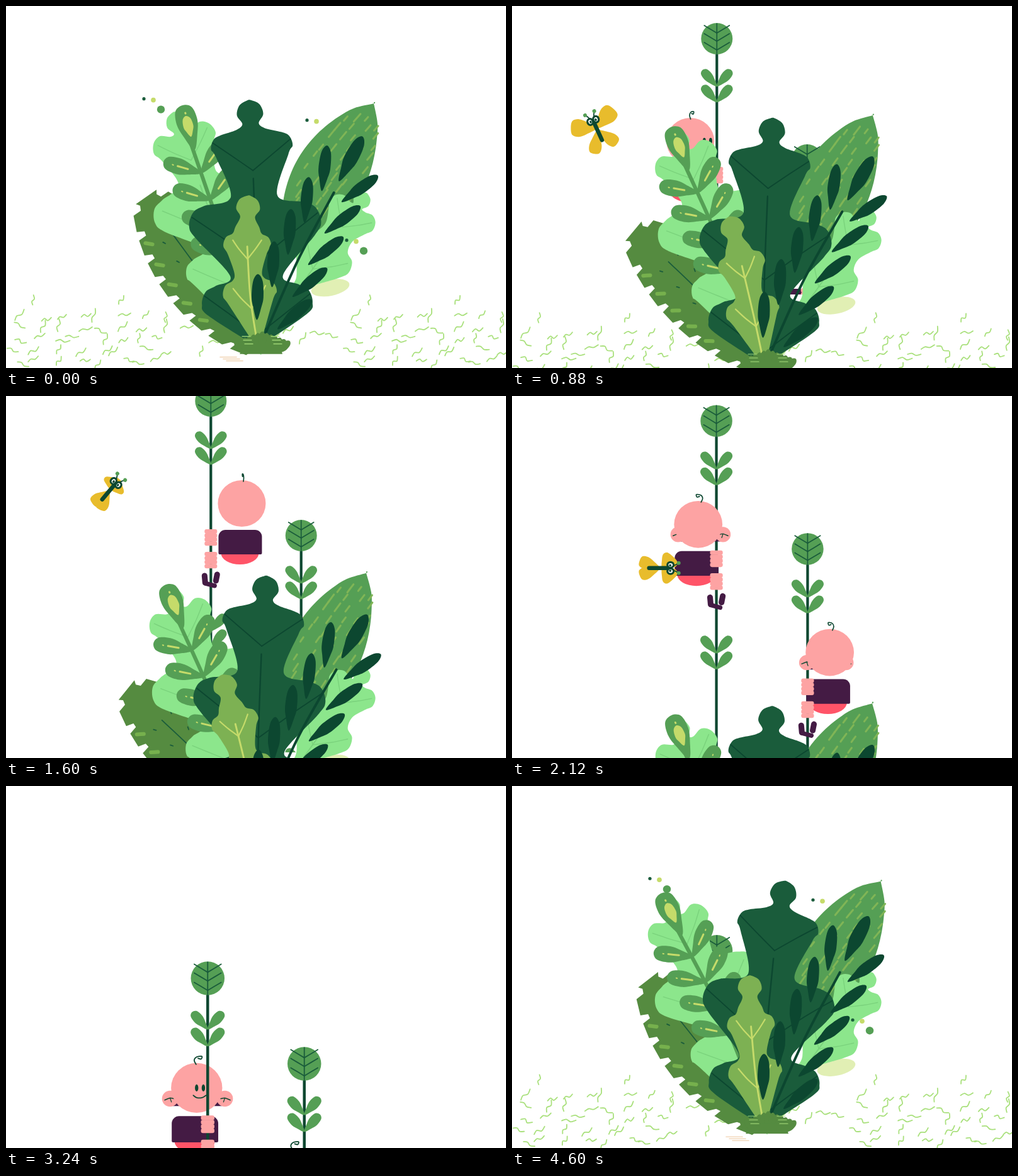
Write an HTML page with a canvas that moves like this. It is 794x576 px and loops after 4.64 s.

```html
<!DOCTYPE html>
<html lang="en">
<head>
<meta charset="utf-8">
<title>Garden climb</title>
<style>
html, body { margin: 0; width: 100%; height: 100%; overflow: hidden; background: #fff; }
canvas { display: block; }
</style>
</head>
<body>
<canvas id="stage" width="794" height="576"></canvas>
<script>
const ctx = document.getElementById('stage').getContext('2d');
const LOOP = 4640, REGROW = 3400, LEAD = 1000;
const C = {
  deep: '#0c4730', dark: '#1a5c3b', mid: '#559f55', olive: '#7db153', moss: '#558b40',
  light: '#8ce68c', lightVein: '#7ad27c', lemon: '#c5db6a', cream: '#e1efb4', grass: '#a9e07c',
  dash: '#80b556', skin: '#fda3a3', plum: '#441b44', red: '#ff5468', gold: '#e8bc2c', sand: '#f3d9bd'
};

const clamp01 = v => Math.max(0, Math.min(1, v));
const smooth = v => { v = clamp01(v); return v * v * (3 - 2 * v); };
const mix = (a, b, s) => a + (b - a) * s;

function randomizer(seed) {
  return () => (seed = seed * 16807 % 2147483647) / 2147483647;
}

// Monotone spline through flat [time, value, ...] keys.
function track(keys, time) {
  const n = keys.length / 2, T = i => keys[2 * i], V = i => keys[2 * i + 1];
  const slope = i => (V(i + 1) - V(i)) / (T(i + 1) - T(i));
  const tangent = i => {
    if (i === 0 || i === n - 1) return 0;
    const a = slope(i - 1), b = slope(i);
    return a * b <= 0 ? 0 : 2 * a * b / (a + b);
  };
  if (time <= T(0)) return V(0);
  if (time >= T(n - 1)) return V(n - 1);
  let i = 0;
  while (time > T(i + 1)) i++;
  const span = T(i + 1) - T(i), s = (time - T(i)) / span, r = 1 - s;
  return V(i) * (1 + 2 * s) * r * r + V(i + 1) * s * s * (3 - 2 * s)
    + span * s * r * (tangent(i) * r - tangent(i + 1) * s);
}

// ---- drawing helpers; `warp` maps a local point to the screen ----
const same = (x, y) => [x, y];

function trace(pts, closed) {
  const n = pts.length;
  const at = i => closed ? pts[(i + n) % n] : pts[Math.max(0, Math.min(n - 1, i))];
  ctx.beginPath();
  ctx.moveTo(...pts[0]);
  for (let i = 0; i < (closed ? n : n - 1); i++) {
    const [a, b, c, d] = [at(i - 1), at(i), at(i + 1), at(i + 2)];
    ctx.bezierCurveTo(b[0] + (c[0] - a[0]) / 6, b[1] + (c[1] - a[1]) / 6,
      c[0] - (d[0] - b[0]) / 6, c[1] - (d[1] - b[1]) / 6, c[0], c[1]);
  }
}

function fill(color) {
  ctx.fillStyle = color;
  ctx.fill();
}

function line(flat, color, width, warp = same) {
  const pts = [];
  for (let i = 0; i < flat.length; i += 2) pts.push(warp(flat[i], flat[i + 1]));
  trace(pts, false);
  ctx.strokeStyle = color;
  ctx.lineWidth = width;
  ctx.stroke();
}

function oval(x, y, rx, ry, color, turn = 0) {
  ctx.beginPath();
  ctx.ellipse(x, y, rx, ry, turn, 0, 7);
  fill(color);
}

// Leaflet from stem point a to tip b; `belly` moves the widest part towards the tip.
function petal(ax, ay, bx, by, half, color, warp = same, belly = 0.5) {
  const [x0, y0] = warp(ax, ay), [x1, y1] = warp(bx, by);
  const dx = x1 - x0, dy = y1 - y0, full = Math.hypot(bx - ax, by - ay);
  const p = (s, w) => [x0 + dx * s - dy / full * half * w, y0 + dy * s + dx / full * half * w];
  const late = (1 + belly) / 2 + .1;
  trace([p(0, 0), p(belly * .55, .68), p(belly, 1), p(late, .8), p(1, 0),
    p(late, -.8), p(belly, -1), p(belly * .55, -.68)], true);
  fill(color);
}

// Closes a half outline of [side, height] points by mirroring it over the stem.
const mirrored = (half, warp) =>
  [...half, ...half.map(([x, h]) => [-x, h]).reverse()].map(p => warp(...p));

// ---- leaves: side and height are measured from the root along the stem ----

// Lobes from root to tip: [reach, height, radius]; radius 0 is a notch.
function lobedLeaf(lobes, color, vein, veinWidth, veinReach) {
  const half = [[3, 0]];
  for (const [x, h, r] of lobes)
    for (const a of r ? [-.9, -.1, .7, 1.4] : [0]) half.push([x - r + r * Math.cos(a), h + r * Math.sin(a)]);
  const height = lobes.at(-1)[1];
  return w => {
    trace(mirrored(half, w), true);
    fill(color);
    line([0, 5, 0, height * .35, 0, height * .72], vein, veinWidth * 1.3, w);
    for (const [x, h, r] of lobes.slice(0, -1)) {
      if (!r) continue;
      for (const side of [-veinReach, veinReach])
        line([0, h - x * .6, side * x * .55, h - x * .2, side * x, h + r * .4], vein, veinWidth, w);
    }
  };
}

function serratedLeaf(w) {
  const width = h => 65 * Math.sin(Math.PI * (.06 + .87 * h / 296)) ** .6;
  const half = [];
  for (let h = 0; h < 280; h += 37)
    half.push([width(h), h], [width(h + 24), h + 24], [width(h + 26) - 13, h + 24], [width(h + 34) - 12, h + 31]);
  half.push([20, 296]);
  ctx.beginPath();
  for (const p of mirrored(half, w)) ctx.lineTo(...p);
  fill(C.moss);
  line([0, 20, 0, 130, 0, 222], C.dark, 1.8, w);
  for (let h = 85; h < 270; h += 37) {
    for (const side of [-1, 1]) {
      const x = side * width(h) * .74;
      line([x - 4, h + 4, x + 4, h - 4], '#76b04d', 6, w);
      line([side * 18, h - 15, side * 20, h - 11], C.dark, 1.8, w);
    }
  }
}

function broadLeaf(w) {
  const width = h => 58 * Math.sin(Math.PI * clamp01((h - 150) / 282)) ** .7;
  const half = [];
  for (let h = 150; h <= 432; h += 23.5) half.push([width(h), h]);
  trace(mirrored(half, w), true);
  fill(C.mid);
  const random = randomizer(11);
  for (let h = 190; h < 405; h += 17) {
    for (let lane = -2; lane <= 2; lane++) {
      const x = width(h) * (lane * .36 + random() * .1), y = h + random() * 14, len = 4 + random() * 4;
      if (random() < .75) line([x, y - len, x + len * .3, y + len], C.dash, 3, w);
    }
  }
}

function sprigLeft(w) {
  line([0, 30, 0, 180, 0, 345], C.mid, 6, w);
  for (let h = 155; h < 300; h += 45.5) {
    for (const side of [-1, 1]) {
      petal(0, h, side * 51, h + 37, 13, C.mid, w, .6);
      line([side * 18, h + 13, side * 32, h + 23], C.lemon, 3, w);
      line([side * 38, h + 27, side * 39, h + 28], C.lemon, 2, w);
    }
  }
  petal(2, 330, 8, 404, 17, C.mid, w, .62);
  petal(4, 352, 7, 386, 8, C.lemon, w);
  line([8, 390, 8, 391], C.lemon, 3, w);
}

function sprigDark(w) {
  line([3, 22, 0, 150, 0, 272], C.deep, 4, w);
  for (let h = 37; h < 270; h += 57)
    for (const side of [-1, 1]) petal(side * 18, h, side * 47, h + 66, 9.3, C.deep, w);
  petal(-2, 292, -6, 372, 11, C.deep, w);
}

const paleLeft = lobedLeaf([[70, 140, 24], [27, 174, 0], [88, 242, 28], [32, 283, 0], [52, 345, 22],
  [18, 360, 0], [18, 377, 18]], C.light, C.lightVein, 1.4, .8);
const paleRight = lobedLeaf([[25, 90, 14], [14, 125, 0], [50, 180, 24], [26, 222, 0], [42, 257, 18],
  [16, 272, 0], [14, 284, 14]], C.light, C.lightVein, 1.4, .8);
const darkOak = lobedLeaf([[88, 70, 27], [42, 112, 0], [105, 196, 30], [37, 238, 0], [65, 318, 20],
  [23, 345, 0], [21, 370, 21]], C.dark, C.deep, 1.8, .95);
const oliveOak = lobedLeaf([[43, 86, 21], [22, 118, 0], [38, 162, 18], [19, 190, 0], [19, 221, 19]],
  C.olive, C.lemon, 2.2, .6);

function paleRightWithRim(w) {
  const [x, y] = w(40, 142), scale = Math.hypot(x - 400, y - 540) / 148;
  oval(x, y, 31 * scale, 13 * scale, C.cream, -.2);
  paleRight(w);
}

// Back to front. Bend is the turn at the tip: early and late rest values plus a springy kick;
// curl is the extra bend of a plant that is still small.
const BUSH = [
  { draw: serratedLeaf, born: 570, height: 290, lean: -.677, early: .03, late: -.21, kick: -.12 },
  { draw: broadLeaf, born: 760, height: 430, lean: .3, early: .29, late: .22, kick: 0 },
  { draw: paleLeft, born: 660, height: 390, lean: -.342, early: -.1, late: -.05, kick: -.3 },
  { draw: paleRightWithRim, born: 615, height: 298, lean: .619, early: 0, late: 0, kick: 0 },
  { draw: sprigLeft, born: 760, height: 400, lean: -.3, early: -.2, late: -.18, kick: -.5 },
  { draw: darkOak, born: 540, height: 390, lean: -.01, early: .12, late: .09, kick: .55 },
  { draw: oliveOak, born: 620, height: 240, lean: -.2, early: .235, late: -.08, kick: -.15 },
  { draw: sprigDark, born: 705, height: 340, lean: .408, early: .13, late: .17, kick: 0, curl: -1.8 }
];

// Bends a plant along a circular arc that leaves the root at angle `lean`.
function arcWarp(lean, bend, grow, height) {
  const k = (Math.abs(bend) < 1e-4 ? 1e-4 : bend) / (height * grow);
  const sin = Math.sin(lean), cos = Math.cos(lean);
  return (x, h) => {
    const a = h * grow * k;
    const side = (1 - Math.cos(a)) / k + x * grow * Math.cos(a);
    const up = Math.sin(a) / k - x * grow * Math.sin(a);
    return [400 + side * cos + up * sin, 540 - up * cos + side * sin];
  };
}

function drawBush(u) {
  const since = Math.max(0, u - 760);
  const spring = Math.exp(-since / 250) * Math.cos(since * Math.PI / 200);
  const settled = smooth((u - 1200) / 800);
  for (const { draw, born, height, lean, early, late, kick, curl = 0 } of BUSH) {
    const grow = 1 - (1 - clamp01((u - born) / 300)) ** 3;
    if (grow < .01) continue;
    draw(arcWarp(lean, mix(early, late, settled) + kick * spring + curl * (1 - grow), grow, height));
  }
}

// ---- ground ----
function squiggle(x, y, random) {
  const turn = random() * 1.9 - 1.2, len = 7 + random() * 4, wave = 2 + random() * 1.5;
  const c = Math.cos(turn), s = Math.sin(turn);
  line([-len, wave, -len * .4, -wave * .4, len * .3, wave * .6, len, -wave], C.grass, 1.8,
    (a, b) => [x + a * c - b * s, y + a * s + b * c]);
}

function drawGround() {
  for (const left of [0, 534]) {
    const random = randomizer(77);
    for (const x of [43, 183]) squiggle(left + x, 467, random);
    for (let row = 0; row < 5; row++)
      for (let i = 0; i < 8; i++)
        squiggle(left + 5 + 33 * (i + random() * .8), 488 + row * 18 + random() * 10, random);
  }
  const random = randomizer(5);
  for (let i = 0; i < 11; i++) squiggle(287 + i * 23, 510 + random() * 58, random);
  for (let i = 0; i < 3; i++) line([340 + i * 5, 558 + i * 3, 366 + i * 5, 558 + i * 3], C.sand, 1.6);
}

function drawTuft() {
  for (let i = -6; i <= 6; i++)
    petal(407 + i * 4, 552, 407 + i * 7.3, 517 + Math.abs(i) * 2.6, 6, C.moss);
  ctx.beginPath();
  for (const [x, y] of [[371, 553], [380, 536], [434, 536], [439, 553]]) ctx.lineTo(x, y);
  fill(C.moss);
  for (let i = 0; i < 3; i++)
    for (const x of [375, 421]) line([x + i * 2, 525 + i * 6, x + 13 + i * 2, 525 + i * 6], C.grass, 1.2);
}

function drawSpecks(u) {
  const rise = 14 * (1 - smooth((u - 720) / 280));
  const size = delay => smooth((u - 650 - delay) / 100) * (1 - smooth((u - 1350) / 250));
  for (const [x, y, trio] of [[219, 147, true], [478, 181, false], [541, 372, true]]) {
    const wait = trio ? 0 : 130;
    oval(x, y + rise, 2.6 * size(wait), 2.6 * size(wait), C.dark);
    oval(x + 15, y + 2 + rise, 3.8 * size(130), 3.8 * size(130), C.lemon);
    if (trio) oval(x + 27, y + 17 + rise, 6.2 * size(0), 6.2 * size(0), C.mid);
  }
}

// ---- climbers ----
const HEAD = [1000,330, 1200,262, 1560,106, 1880,52, 2600,8, 3280,56, 3680,132, 4240,306, 4700,630];
const GAP = [1880,193, 2600,214, 3680,180, 4240,136];
const PAN = [1400,0, 1880,29, 2600,137, 3280,427, 3700,700];

const pan = u => 130 * Math.exp(-u / 190) + track(PAN, u);
const zoomAt = u => 1 + .07 * Math.max(0, (u - 2600) / 1640) ** 1.7;
const orbit = u => Math.min(5.95, -1 + (u - 1880) * .00383);

function drawStalk() {
  line([0, 0, 0, 900], C.deep, 4.2);
  for (const y of [76, 101, 366, 391])
    for (const side of [-1, 1]) petal(0, y, side * 23, y - 26, 7.5, C.mid, same, .6);
  oval(0, 0, 25, 25, C.mid);
  line([0, -24, 0, 25], C.dark, 1.7);
  for (const y of [-9, 4, 18])
    for (const side of [-20, 20]) line([side, y - 12, 0, y], C.dark, 1.7);
}

function drawEar(x, y, d) {
  ctx.beginPath();
  for (const [dx, dy] of [[4, 11], [16, 11], [10, 3]]) ctx.lineTo(x - d * dx, y + dy);
  fill(C.plum);
  oval(x, y, 12, 12, C.skin);
  line([x + d * 8, y + 2, x, y - 1, x - d * 6, y], C.deep, 1.4);
  line([x, y - 1, x - d * 2, y + 5], C.deep, 1.2);
}

function drawKid(turn) {
  const side = Math.sin(turn), depth = Math.cos(turn);
  const look = -37 * side * Math.abs(side);
  if (Math.abs(depth) > .6)
    for (const d of [-1, 1]) drawEar(look * .3 + d * 43 * Math.abs(depth), 16, d);
  oval(0, 0, 38, 37, C.skin);
  const curl = depth * 6;
  line([2 - curl * .5, -35, 2 - curl, -41, 2 - curl * .4, -46, 2 + curl, -47, 2 + curl * .8, -43, 2, -44],
    C.deep, 1.7);
  if (depth > 0) {
    ctx.save();
    ctx.beginPath();
    ctx.ellipse(0, 0, 38, 37, 0, 0, 7);
    ctx.clip();
    for (const d of [-5, 5]) oval(look + d + 1, 0, 2.5, 5.2, C.deep);
    line([look - 9, 11, look - 4, 14.5, look + 4, 14.5, look + 10, 11], C.deep, 1.6);
    ctx.restore();
  }
  ctx.beginPath();
  ctx.ellipse(-3, 79, 30, 18, 0, 0, Math.PI);
  fill(C.red);
  ctx.beginPath();
  ctx.roundRect(-37, 42, 69, 39, [11, 11, 2, 2]);
  fill(C.plum);
}

function drawGrip() {
  for (const y of [41, 77]) {
    for (let i = 0; i < 4; i++) {
      ctx.beginPath();
      ctx.roundRect(-10, y + i * 6.4, 20, 7, 3);
      fill(C.skin);
    }
  }
  line([-10, 115, -9, 126], C.plum, 9);
  line([10, 113, 8, 123], C.plum, 9);
  line([-9, 127, 6, 131], C.plum, 7);
}

function drawClimber(second, u) {
  const zoom = zoomAt(u), turn = orbit(u - second * 360);
  ctx.save();
  ctx.translate(397 + (second ? 71.7 : -71.7) * zoom, track(HEAD, u) + second * track(GAP, u));
  ctx.scale(zoom, zoom);
  const kid = () => {
    ctx.save();
    ctx.translate(50 * Math.sin(turn), 163);
    drawKid(turn);
    ctx.restore();
  };
  const behind = Math.cos(turn) > 0;
  if (behind) kid();
  drawStalk();
  if (!behind) kid();
  ctx.translate(0, 163);
  drawGrip();
  ctx.restore();
}

// ---- butterfly ----
function drawButterfly(u) {
  const x = track([1480,-50, 1880,135, 2600,165, 3280,266, 3680,360, 3900,425], u);
  const y = track([1480,290, 1880,196, 2600,150, 3280,330, 3680,508, 3900,630], u);
  const spread = .62 + .38 * Math.cos(2 * Math.PI * (u - 1880) / 288);
  ctx.save();
  ctx.translate(x, y);
  ctx.rotate(track([1880,-.43, 2600,.7, 3680,2.12], u));
  for (const d of [-1, 1]) {
    petal(0, -2, d * 37 * spread, -19, 14, C.gold, same, .68);
    petal(0, 2, d * (4 + 16 * spread), 34, 10, C.gold, same, .68);
  }
  line([0, -10, 0, 19], C.deep, 6.5);
  for (const d of [-1, 1]) {
    line([d * 3, -17, d * 5, -23, d * 8, -28], C.deep, 1.8);
    oval(d * 8, -28, 3, 3, C.mid);
    oval(d * 5, -15, 6, 6.5, C.deep);
    oval(d * 5, -15, 2.8, 3.4, '#fff');
    oval(d * 4.4, -14.5, 1.7, 2.1, C.deep);
  }
  ctx.restore();
}

function drawScene(u) {
  const drop = pan(u);
  if (u >= LEAD) {
    ctx.save();
    ctx.beginPath();
    ctx.rect(0, 0, 794, 430 + drop);
    ctx.clip();
    drawClimber(0, u);
    drawClimber(1, u);
    ctx.restore();
  }
  if (drop < 450) {
    ctx.save();
    ctx.translate(0, drop);
    drawGround();
    drawBush(u);
    drawTuft();
    drawSpecks(u);
    ctx.restore();
  }
  if (u > 1480 && u < 3900) drawButterfly(u);
}

// Each scene outlives the loop a little: the next bush sprouts while the stalks still sink.
let start;
function frame(now) {
  start ??= now;
  const t = (now - start) % LOOP;
  ctx.fillStyle = '#fff';
  ctx.fillRect(0, 0, 794, 576);
  ctx.lineCap = ctx.lineJoin = 'round';
  drawScene(t + LEAD);
  if (t >= REGROW) drawScene(t - REGROW);
  requestAnimationFrame(frame);
}
requestAnimationFrame(frame);
</script>
</body>
</html>
```
